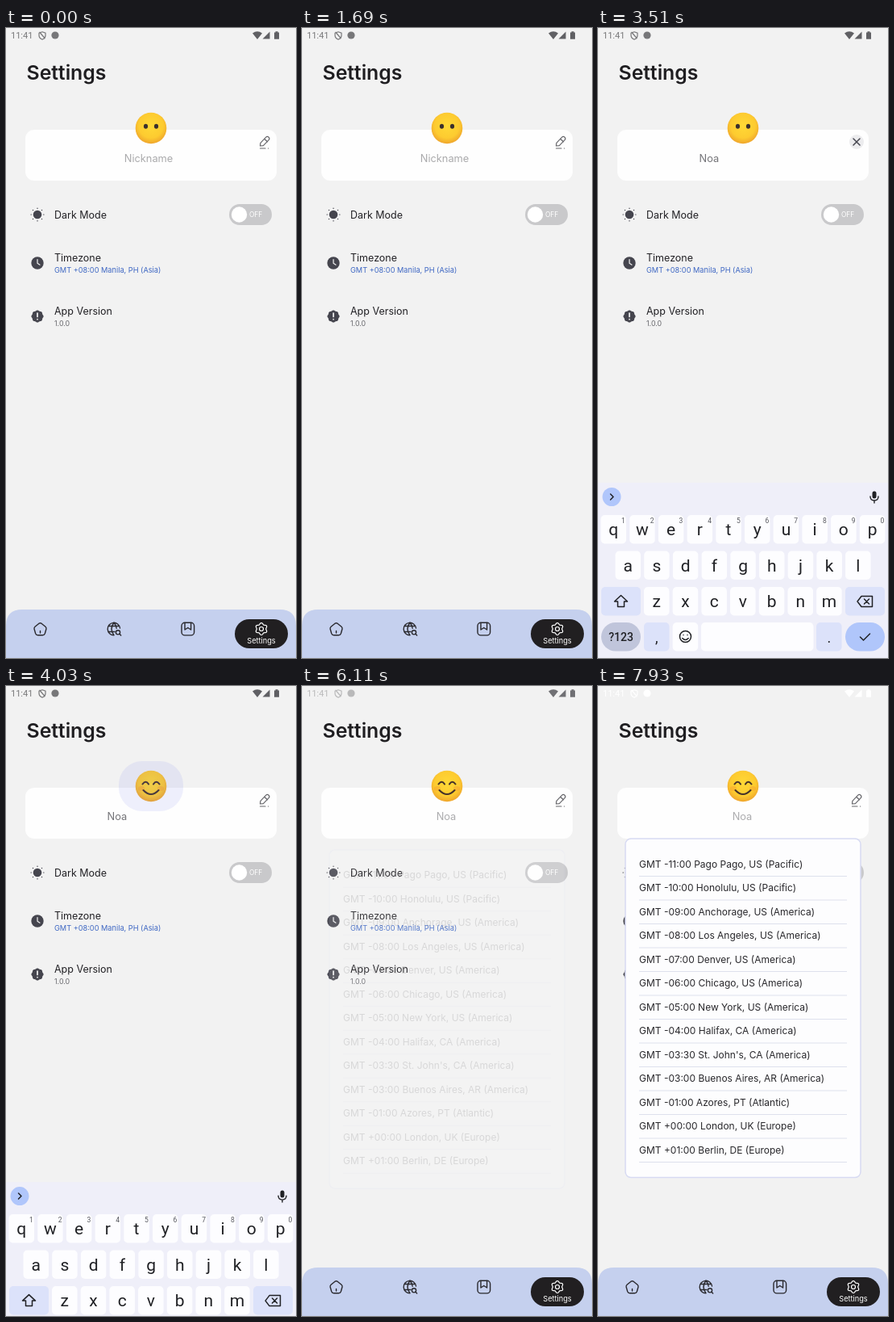
Recreate the animation shown at these times as an HTML page. Size 360 by 780 pixels, loop 8 s.

```html
<!DOCTYPE html>
<html lang="en">
<head>
<meta charset="utf-8">
<title>Settings screen</title>
<style>
html, body { margin: 0; width: 100%; height: 100%; overflow: hidden; background: #f2f2f2; }
svg { display: block; width: 360px; height: 780px; font-family: Inter, "Open Sans", sans-serif; }
.roboto { font-family: Roboto, sans-serif; }
.line { fill: none; stroke: #45454e; stroke-width: 1.2; stroke-linecap: round; stroke-linejoin: round; }
.mid { text-anchor: middle; }
</style>
</head>
<body>
<svg id="stage" viewBox="0 0 360 780">
  <defs>
    <radialGradient id="face" cx=".5" cy=".42" r=".58">
      <stop offset="0" stop-color="#ffd936"/>
      <stop offset=".68" stop-color="#fdcb30"/>
      <stop offset="1" stop-color="#efa52c"/>
    </radialGradient>
  </defs>
  <rect width="360" height="780" fill="#f2f2f2"/>

  <g id="status" class="roboto" fill="#777779">
    <text x="6" y="13" font-size="11">11:41</text>
    <path d="M45 4.8l4 1.4v3c0 2.3-1.7 4-4 5-2.3-1-4-2.7-4-5v-3zM41.5 5l7 8" fill="none" stroke="#777779" stroke-width="1.2"/>
    <circle cx="61" cy="9" r="4.6"/>
  </g>
  <g id="signal" fill="#606064">
    <path d="M306 6.5q6-4.5 12 0l-6 7.500zM327.5 4.5v9h-9z"/>
    <path d="M333 5.5h1.5v-1.2h3v1.2h1.5v8.3h-6z"/>
  </g>

  <text x="25.5" y="64" font-size="24.8" font-weight="600" fill="#1f1e21">Settings</text>

  <rect x="24" y="126" width="312" height="63" rx="11" fill="#fefefe"/>
  <circle cx="180" cy="124" r="19.3" fill="url(#face)"/>
  <g id="plainFace" fill="#3b302d">
    <ellipse cx="173.5" cy="121.8" rx="2.6" ry="3"/>
    <ellipse cx="186.5" cy="121.8" rx="2.6" ry="3"/>
  </g>
  <g id="smileFace">
    <ellipse cx="168" cy="127" rx="4" ry="3" fill="#f58b32" opacity=".3"/>
    <ellipse cx="192" cy="127" rx="4" ry="3" fill="#f58b32" opacity=".3"/>
    <path d="M169.5 121.5q4-5.500 7.500 0M183 121.5q3.500-5.500 7.500 0M170.5 129q9.500 10 19 0" fill="none" stroke="#46332a" stroke-width="2.1" stroke-linecap="round"/>
  </g>
  <rect id="ripple" x="140" y="93" width="80" height="62" rx="29" fill="#646ee6" fill-opacity=".1"/>
  <text id="nick" y="165.5" font-size="12.8"></text>
  <g id="pencil" class="line" style="stroke:#66666b">
    <path d="M315.5 146l.4-3.600 6.600-7q1.800-1.700 3.600-.2 1.600 1.700.1 3.500l-6.800 7zM321 137.500l3.500 3.300M315.5 149h6.500M325.500 149h.2"/>
  </g>
  <g id="close">
    <circle cx="321" cy="141" r="9" fill="#ececee"/>
    <path class="line" d="M317 137l8 8m0-8l-8 8" style="stroke-width:1.5"/>
  </g>

  <g id="rows" fill="#232226">
    <circle cx="39" cy="231" r="5.3" fill="#45454e"/>
    <path id="rays" class="line"/>
    <text x="60" y="235.5" font-size="12.5">Dark Mode</text>
    <rect x="277" y="218" width="53" height="26" rx="13" fill="#c9c9cb"/>
    <circle cx="289.5" cy="231" r="9.7" fill="#fff"/>
    <text x="302" y="234.2" font-size="8.3" fill="#fff">OFF</text>

    <circle cx="39" cy="291" r="7.7" fill="#45454e"/>
    <path class="line" d="M39 286.5v4.7l3 2" style="stroke:#f2f2f2"/>
    <text x="60" y="289.3" font-size="12.5">Timezone</text>
    <text x="60" y="302.5" font-size="9.2" fill="#3e67c3">GMT +08:00 Manila, PH (Asia)</text>

    <path id="badge" fill="#45454e"/>
    <path class="line" d="M39 353v4.5M39 360.5v.2" style="stroke:#f2f2f2;stroke-width:1.7"/>
    <text x="60" y="355.3" font-size="12.5">App Version</text>
    <text x="60" y="368.5" font-size="8.8" fill="#66666b">1.0.0</text>
  </g>

  <g id="nav">
    <path d="M0 780v-40q0-20 20-20h320q20 0 20 20v40z" fill="#c5d0ee"/>
    <g class="line" style="stroke:#29282d;stroke-width:1.4">
      <path d="M41 737.2q1.5-1 3 0l5 4q1.4 1.2.9 3l-1.6 5.6q-.7 2-2.8 2h-6q-2.1 0-2.8-2l-1.6-5.6q-.5-1.8.9-3zM42.5 746.5v2.5"/>
      <path d="M141.5 743a7.7 7.7 0 1 0-7.5 8.7M134 736.3q-6 7.7 0 15.4M134 736.3q3 3.5 3.2 7M127.5 740.5h13M127.5 747.5h7.5"/>
      <circle cx="139" cy="748.3" r="2.6"/>
      <path d="M141 750.3l1.7 1.7"/>
      <rect x="218" y="736.3" width="15.6" height="15.6" rx="4"/>
      <path d="M222 736.5v8.5l3.8-2.5 3.8 2.5v-8.5"/>
    </g>
    <rect x="284" y="732" width="66" height="36" rx="18" fill="#211f21"/>
    <g class="line" style="stroke:#fff">
      <path id="gear"/>
      <circle cx="317" cy="744" r="2.5"/>
    </g>
    <text class="mid" x="317" y="762.3" font-size="9.2" fill="#fff">Settings</text>
  </g>

  <g id="keyboard" class="roboto" fill="#202125">
    <rect y="563" width="360" height="217" fill="#efeff9"/>
    <circle cx="17" cy="580.5" r="11.5" fill="#b0c6fb"/>
    <path class="line" d="M15.5 577l3.5 3.5-3.5 3.5" style="stroke:#202125;stroke-width:1.5"/>
    <rect x="340.5" y="573.5" width="5" height="9" rx="2.5"/>
    <path class="line" d="M338 580q0 5 5 5t5-5M343 585v3" style="stroke:#202125;stroke-width:1.4"/>
    <g id="chip">
      <rect x="117.5" y="569.5" width="131" height="23.5" rx="6.5" fill="#fdfdff" stroke="#e0e1ee"/>
      <path d="M126 576.5h10v10.5h-10zM129 575h4v2.5h-4zM128.5 580h5M128.5 582.3h5M128.5 584.6h3.5" fill="none" stroke="#8eabed"/>
      <text x="141.5" y="585.3" font-size="11" font-weight="500">Testing Phase - A...</text>
    </g>
    <g id="keys"></g>
    <g class="line" style="stroke:#202125;stroke-width:1.5">
      <path d="M28.5 702.5l8 7.5h-4v6.5h-8v-6.5h-4z"/>
      <path d="M322 710l5-6.5h13.5v13h-13.5zM330.5 707l6 6m0-6l-6 6"/>
      <circle cx="108.5" cy="753.5" r="7"/>
      <path d="M106 751.5v.1M111 751.5v.1M104.8 755.5q3.7 4 7.4 0M325.5 754l4 4 8-8"/>
    </g>
  </g>

  <g id="modal">
    <rect x="34" y="189" width="292" height="419.5" rx="7" fill="#fdfdfe" stroke="#d7daf2" stroke-width="1.5"/>
    <g id="zones" font-size="12" fill="#29282c"></g>
  </g>
</svg>
<script>
const $ = id => document.getElementById(id);
const LOOP = 8000, PITCH = 35.7;
const NICK = "Noa";

function add(parent, tag, attrs, text) {
  const el = document.createElementNS("http://www.w3.org/2000/svg", tag);
  for (const k in attrs) el.setAttribute(k, attrs[k]);
  if (text) el.textContent = text;
  return parent.appendChild(el);
}

function scallop(cx, cy, radius, depth, lobes) {
  const points = Array.from({ length: 73 }, (_, i) => {
    const a = i * Math.PI / 36, r = radius + depth * Math.cos(lobes * a);
    return (cx + r * Math.sin(a)).toFixed(2) + " " + (cy - r * Math.cos(a)).toFixed(2);
  });
  return "M" + points.join("L") + "z";
}

function key(x, y, w, label, size = 21, fill = "#fdfdff", rx = 5) {
  add($("keys"), "rect", { x, y, width: w, height: 35.5, rx, fill });
  if (label) add($("keys"), "text", { x: x + w / 2, y: y + 25, "font-size": size, class: "mid" }, label);
}

function buildKeyboard() {
  [["qwertyuiop", 3.5, 603], ["asdfghjkl", 21.5, 647.5], ["zxcvbnm", 57, 692]].forEach(([letters, x, y], row) =>
    [...letters].forEach((c, i) => {
      key(x + i * PITCH, y, 31.5, c);
      if (!row) add($("keys"), "text", { x: x + i * PITCH + 28, y: y + 9.5, "font-size": 8.5, class: "mid", fill: "#55565d" }, String((i + 1) % 10));
    }));
  const soft = "#dce2fa";
  key(4, 692, 49, "", 0, soft);
  key(307, 692, 49, "", 0, soft);
  key(4, 736, 49, "", 0, "#c0c5db", 17.7);
  add($("keys"), "text", { x: 28.5, y: 758.5, "font-size": 14, "font-weight": 500, class: "mid" }, "?123");
  key(57, 736, 31.5, ",", 18, soft);
  key(92.7, 736, 31.5);
  key(128, 736, 139.5);
  key(271, 736, 31.5, ".", 18, soft);
  key(307, 736, 49, "", 0, "#b0c6fb", 17.7);
}

function buildZones() {
  ["-11:00 Pago Pago, US (Pacific)", "-10:00 Honolulu, US (Pacific)", "-09:00 Anchorage, US (America)",
    "-08:00 Los Angeles, US (America)", "-07:00 Denver, US (America)", "-06:00 Chicago, US (America)",
    "-05:00 New York, US (America)", "-04:00 Halifax, CA (America)", "-03:30 St. John's, CA (America)",
    "-03:00 Buenos Aires, AR (America)", "-01:00 Azores, PT (Atlantic)", "+00:00 London, UK (Europe)",
    "+01:00 Berlin, DE (Europe)"].forEach((zone, i) => {
    const y = 224.7 + i * 29.5;
    add($("zones"), "text", { x: 51, y }, "GMT " + zone);
    add($("zones"), "path", { d: `M51 ${y + 10.8}h258`, stroke: "#dee1ed" });
  });
}

$("rays").setAttribute("d", Array.from({ length: 8 }, (_, i) => {
  const a = i * Math.PI / 4, at = r => (39 + r * Math.cos(a)) + " " + (231 + r * Math.sin(a));
  return `M${at(7.6)}L${at(8)}`;
}).join(""));
$("badge").setAttribute("d", scallop(39, 357, 7.2, 0.4, 8));
$("gear").setAttribute("d", scallop(317, 744, 6.6, 0.9, 6));
buildKeyboard();
buildZones();

const span = (t, a, b) => Math.min(1, Math.max(0, (t - a) / (b - a)));
const show = (id, on) => $(id).style.display = on ? "" : "none";
const fade = (id, v) => { show(id, v > 0); $(id).style.opacity = v; };
const mix = (a, b, p) => `rgb(${a.map((v, i) => Math.round(v + (b[i] - v) * p))})`;

function nickname(t) {
  if (t < 2080) return ["Nickname", 177, "#aaaaac", "middle"];
  if (t < 3030) return ["Enter your Nickname", 163.8, "#656569", "middle"];
  if (t < 4280) return [NICK.slice(0, t < 3220 ? 1 : t < 3400 ? 2 : 3), 125.5, "#747478", "start"];
  return [NICK, 179, "#acacae", "middle"];
}

function render(t) {
  const [text, x, color, anchor] = nickname(t), nick = $("nick");
  nick.textContent = text;
  nick.setAttribute("x", x);
  nick.setAttribute("fill", color);
  nick.setAttribute("text-anchor", anchor);

  const editing = t >= 2080 && t < 3640;
  show("close", editing);
  show("pencil", !editing);
  show("plainFace", t < 3890);
  show("smileFace", t >= 3890);
  fade("ripple", span(t, 3820, 3950) * (1 - span(t, 5000, 5320)));

  const rise = 1 - (1 - span(t, 2200, 2470)) ** 3;
  const fall = span(t, 3900, 4170) ** 2;
  const drop = 217 * (1 - rise + fall);
  show("keyboard", drop < 217);
  $("keyboard").setAttribute("transform", `translate(0 ${drop})`);
  show("chip", t < 3030);
  show("nav", t < 2300 || t >= 4280);

  const open = span(t, 6075, 6360);
  fade("modal", open);
  $("modal").setAttribute("transform", `translate(0 ${15.8 * (1 - open)})`);

  const clock = mix([119, 119, 121], [255, 255, 255], span(t, 6000, 6230));
  $("status").setAttribute("fill", clock);
  $("status").querySelector("path").setAttribute("stroke", clock);
  $("signal").setAttribute("fill", mix([96, 96, 100], [255, 255, 255], span(t, 6090, 6300)));
}

const start = performance.now();
function tick() {
  render((performance.now() - start) % LOOP);
  requestAnimationFrame(tick);
}
tick();
</script>
</body>
</html>
```
